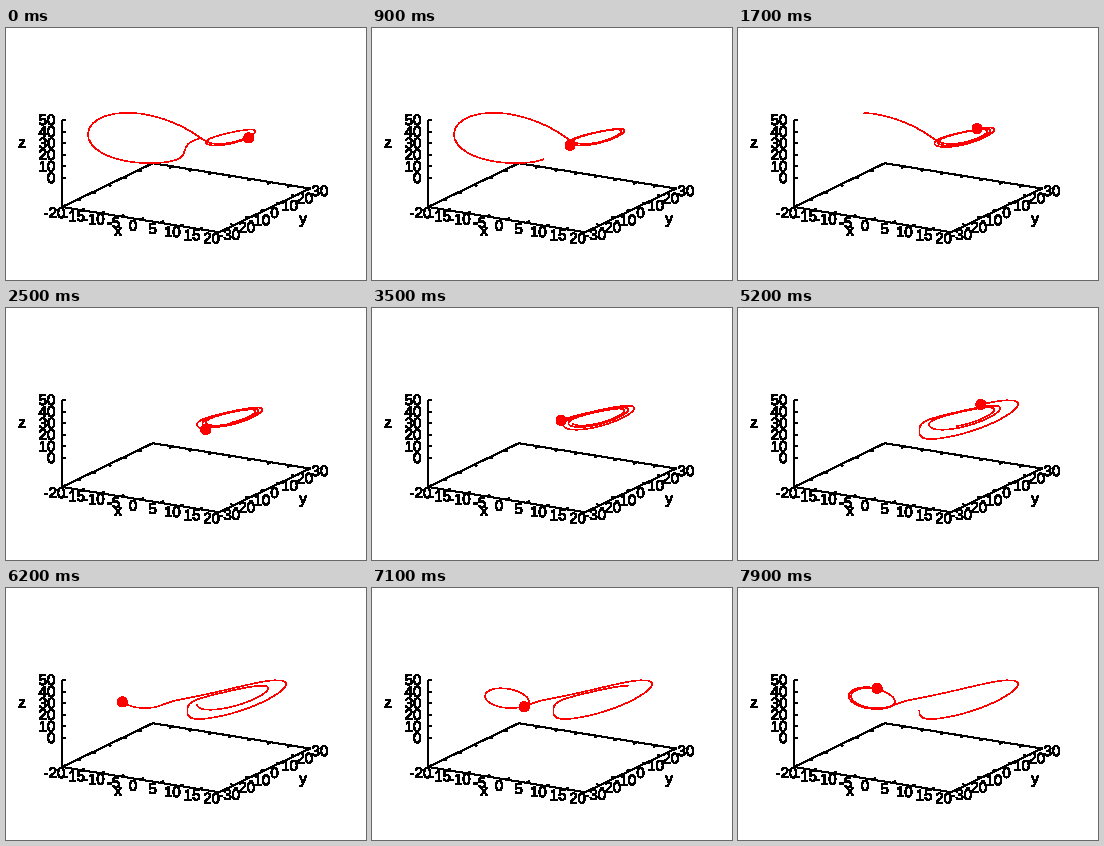
A matplotlib script that plays this animation: 360 px wide and 252 px high, repeating every 8 s.

```python
import numpy as np
import matplotlib.pyplot as plt
from matplotlib.animation import FuncAnimation
from matplotlib.patches import Circle
from matplotlib.patheffects import Normal

W, H = 360, 252
FRAMES, TAIL = 80, 40            # loop length and trail length, in frames
SUB = 4                          # integration steps per frame
DT = 0.05 / SUB
LORENZ = np.array([10, 28, 8 / 3])
SLACK = np.array([0.15, 0.15, 0.03])

# Screen points the orbit passes: frame, x, y, weight
PINS = np.array([
    (-40, 195.5, 109, 0.3), (-31, 172, 131.5, 0.4), (-23, 127, 84, 0.8),
    (-22, 157, 91, 0.4), (0, 243, 109.5, 1), (17, 239, 100, 1),
    (25, 199.5, 121, 1), (32, 236, 102, 0.15), (35, 189, 112, 1),
    (39, 181, 122, 0.8), (45, 183.5, 130, 0.4), (52, 242.5, 96.5, 1),
    (62, 116, 113.5, 1), (79, 139, 99.5, 1),
])


def project(x, y, z):
    u, v = (x + 20) / 40, (y + 30) / 60
    return (56 + 157.2 * u + 90.8 * v,
            150 + 25.3 * u - 43.8 * v - 1.16 * z)


def flow(s, k):
    x, y, z = s
    return np.array([k[0] * (y - x), x * (k[1] - z) - y, x * y - k[2] * z])


def orbit(par, frames):
    """RK4 paths for columns of (x, y, z, sigma, rho, beta)."""
    s, k = par[:3], par[3:]
    out = [s]
    for _ in range(frames * SUB):
        a = flow(s, k)
        b = flow(s + a * (DT / 2), k)
        c = flow(s + b * (DT / 2), k)
        d = flow(s + c * DT, k)
        s = s + (a + 2 * (b + c) + d) * (DT / 6)
        out.append(s)
    return np.array(out)


def misfit(par, pins):
    at = pins[:, 0].astype(int) + TAIL
    hit = orbit(par, at[-1])[at * SUB]
    px, py = project(hit[:, 0], hit[:, 1], hit[:, 2])
    w = pins[:, 3:]
    return np.vstack([(px - pins[:, 1:2]) * w, (py - pins[:, 2:3]) * w,
                      (par[3:] - LORENZ[:, None]) / SLACK[:, None]])


def cost(r):
    return np.nan_to_num((r ** 2).sum(0), nan=np.inf)


def refine(par, pins, rounds):
    """Damped least squares on the start state and constants."""
    eps = 1e-5
    nudges = np.hstack([np.zeros((6, 1)), eps * np.eye(6)])
    for _ in range(rounds):
        r = misfit(par[:, None] + nudges, pins)
        jac = (r[:, 1:] - r[:, :1]) / eps
        a, g = jac.T @ jac, jac.T @ r[:, 0]
        scale = np.diag(np.diag(a) + 1e-6)
        tries = [par] + [par - np.linalg.solve(a + d * scale, g)
                         for d in 10.0 ** np.arange(-5, 4)]
        tries = np.array(tries).T
        c = cost(misfit(tries, pins))
        best = int(np.argmin(c))
        par = tries[:, best]
        if c[0] - c[best] < 1e-3 * c[0]:
            break
    return par


def find_orbit():
    rng = np.random.default_rng(3)
    n = 4000
    start = rng.normal([4.4, -1.1, 30.4], [0.7, 0.8, 1.3], (n, 3)).T
    par = np.vstack([start, np.repeat(LORENZ[:, None], n, axis=1)])
    par = par[:, np.argmin(cost(misfit(par, PINS[:7])))]
    # Lengthen the horizon pin by pin, since the flow is chaotic
    for m in range(7, len(PINS) + 1):
        par = refine(par, PINS[:m], 5)
    par = refine(par, PINS, 10)
    path = orbit(par[:, None], TAIL + FRAMES - 1)[:, :, 0]
    return np.column_stack(project(*path.T))


with np.errstate(all="ignore"):
    path = find_orbit()

plt.rcParams.update({"font.family": "Liberation Sans", "font.size": 15,
                     "text.antialiased": False,
                     "lines.antialiased": False})
fig = plt.figure(figsize=(W / 72, H / 72), dpi=72, facecolor="white")
ax = fig.add_axes([0, 0, 1, 1])
ax.set_xlim(0, W)
ax.set_ylim(H, 0)
ax.axis("off")


def line(*pts, lw=1):
    ax.plot(*zip(*pts), color="black", lw=lw, solid_capstyle="butt",
            solid_joinstyle="miter")


def label(x, y, s, ha="center"):
    # Drawn as outlines, which gives the heavier aliased strokes
    ax.text(x, y, s, ha=ha, va="center_baseline", color="black",
            path_effects=[Normal()])


def floor(x, y):
    return project(x, y, -25)


line(*[floor(x, y) for x, y in
       [(-20, -30), (20, -30), (20, 30), (-20, 30), (-20, -30)]])
line((56, 179), (56, 91.5), lw=2)

for x in range(-20, 21, 5):
    line(floor(x, -30), floor(x, -28))
    line(floor(x, 30), floor(x, 28))
    px, py = floor(x, -30)
    label(px - 7.5, py + 5.5, str(x))
for y in range(-30, 31, 10):
    line(floor(20, y), floor(19.1, y))
    line(floor(-20, y), floor(-19.1, y))
    px, py = floor(20, y)
    label(px + 10, py + 2, str(y))
for z in range(0, 51, 10):
    px, py = project(-20, -30, z)
    line((px, py), (px + 4, py), lw=2)
    label(px - 6.5, py - 0.5, str(z), ha="right")
label(112, 202, "x")
label(297, 190, "y")
label(16, 114, "z")

trail, = ax.plot([], [], color="red", lw=0.5, zorder=5)
ball = ax.add_patch(Circle((0, 0), 5, fc="red", lw=0, antialiased=False,
                           zorder=6))


def draw(i):
    part = path[i * SUB:(i + TAIL) * SUB + 1]
    trail.set_data(part[:, 0], part[:, 1])
    ball.center = part[-1]
    return trail, ball


anim = FuncAnimation(fig, draw, frames=FRAMES, interval=100, repeat=True,
                     repeat_delay=0)
plt.show()
```
